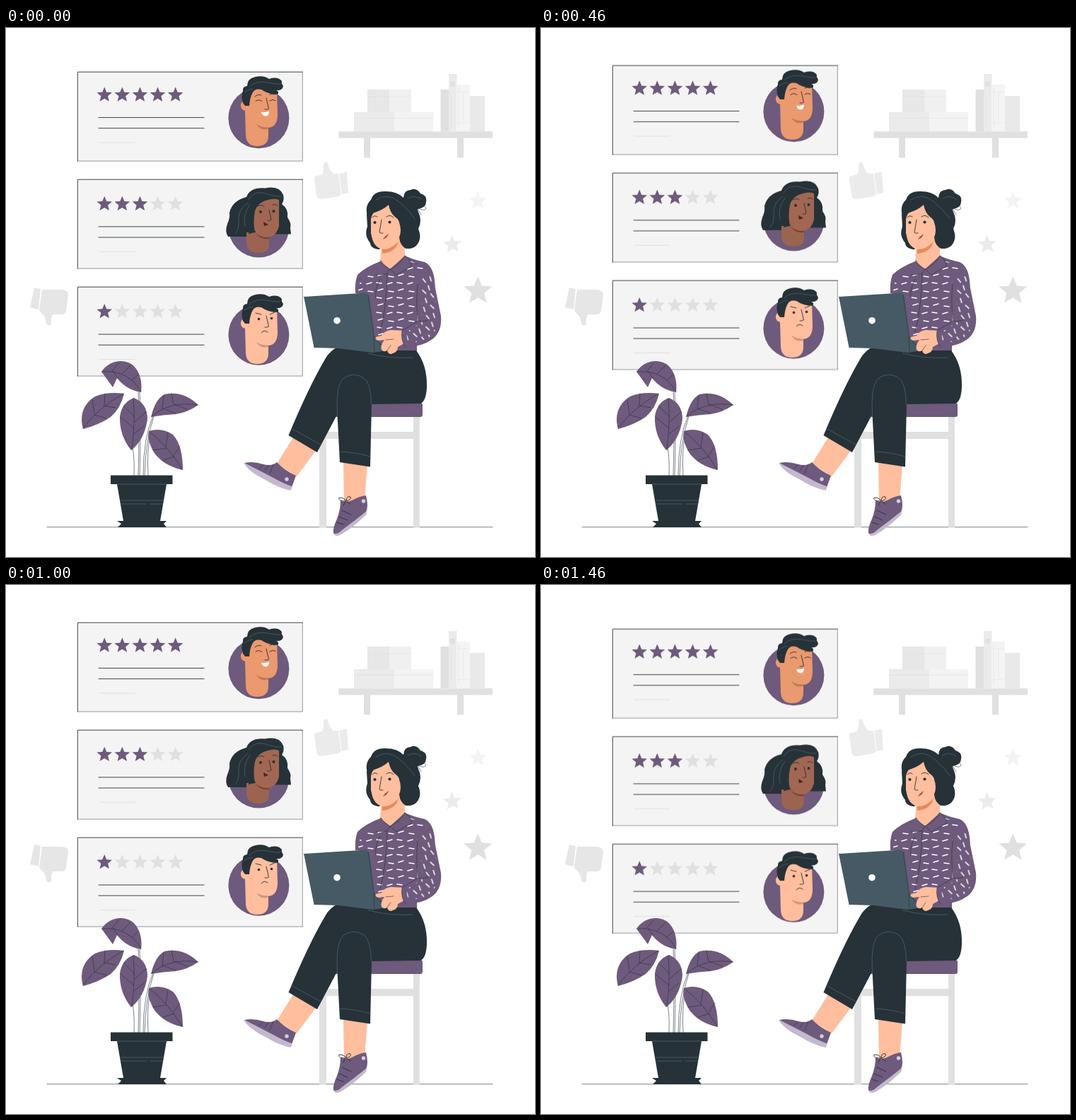
An HTML page without scripts for the animation above (1.5 s loop, 748 px wide and 748 px high).

```html
<!DOCTYPE html>
<html lang="en">
<head>
<meta charset="utf-8">
<title>Customer reviews</title>
<style>
html, body { margin: 0; width: 100%; height: 100%; overflow: hidden; background: #fff; }
svg { display: block; width: 100vw; height: 100vh; }
.dark { fill: #263238; }
.purple { fill: #6e5a7c; }
.skin { fill: #ffbe9d; }
.g1 { fill: #e0e0e0; }
.g2 { fill: #ebebeb; }
.g3 { fill: #f3f3f3; }
.line { fill: none; stroke: #263238; stroke-width: .9; stroke-linecap: round; stroke-linejoin: round; }
.thin { stroke-width: .6; }
.seam { stroke: #536872; stroke-width: .7; }
.shade { stroke: #dfdfdf; }
/* 24 steps a second: up 15px, down 15px */
.cards { animation: float 1.5s -5ms infinite steps(18, end); }
@keyframes float {
  0% { transform: translateY(0); }
  49.999% { transform: translateY(-15px); }
  50% { transform: translateY(-14px); }
  100% { transform: translateY(1px); }
}
</style>
</head>
<body>
<svg viewBox="0 0 748 748" xmlns="http://www.w3.org/2000/svg">
<defs>
  <polygon id="star" points="0,-11.3 3,-4 10.8,-3.5 4.8,1.6 6.7,9.1 0,5 -6.7,9.1 -4.8,1.6 -10.8,-3.5 -3,-4"/>

  <g id="panel">
    <rect x="101.3" y="62.2" width="318" height="125.9" fill="#f4f4f4"/>
    <path class="line" stroke-linecap="butt" d="M419.3 62.2H101.3V188.1"/>
    <path class="line" stroke-width=".6" opacity=".55" d="M101.3 188.1H419.3V62.2"/>
  </g>

  <g id="review">
    <g class="g1">
      <use href="#star" x="139.2" y="94.7"/><use href="#star" x="164.3" y="94.7"/><use href="#star" x="189.4" y="94.7"/>
      <use href="#star" x="214.5" y="94.7"/><use href="#star" x="239.6" y="94.7"/>
    </g>
    <path class="line" stroke-width=".8" d="M131 126.600H280M131 141.700H280"/>
    <path class="line shade" d="M132 162H182"/>
    <circle class="purple" cx="357.4" cy="127.2" r="43"/>
  </g>

  <g id="man">
    <path fill="currentColor" d="M342 88Q362 82 383 87L384 122Q384 140 371 141V152Q371 167 355 167Q340 167 339 152L338 117Q331 115 332 108Q334 102 338 105Z"/>
    <path fill="#000" opacity=".2" d="M354 136Q362 141 371 140.500V142.500Q360 146 354 136Z"/>
    <path class="dark" d="M335 106Q332 96 335 89Q334 83 341 82Q341 72 351 69.500Q364 66 372 72Q384 68 390 75Q389 78 392 82Q391 89 382 88Q387 90 384 94Q371 94 361 87Q352 85 349 91Q345 97 344 110H338Z"/>
    <path class="line seam" d="M344 83Q353 74 369 77T388 79M337 91Q343 86 349 86"/>
    <path class="line" d="M368 99L371.500 114Q369 116 366 115"/>
  </g>

  <pattern id="dashes" width="29" height="21" patternUnits="userSpaceOnUse">
    <path d="M2 3l7 1M17 5l7-2M4 14l7-2M19 15l7 1" fill="none" stroke="#fff" stroke-width="1.5" stroke-linecap="round"/>
  </pattern>
  <pattern id="sleeveDashes" width="24" height="20" patternUnits="userSpaceOnUse" patternTransform="rotate(62)">
    <path d="M2 4l6 1M14 6l6-1M4 14l6-2M16 16l6 1" fill="none" stroke="#fff" stroke-width="1.6" stroke-linecap="round"/>
  </pattern>
</defs>

<!-- shelf -->
<g>
  <path class="g2" d="M492 119h57v27h-57z"/>
  <path class="g3" d="M549 119h55v27h-55z"/>
  <path fill="#e7e7e7" d="M511 87h31v32h-31z"/>
  <path fill="#f0f0f0" d="M542 87h31v32h-31z"/>
  <path class="line shade thin" d="M511 97h62M492 127.500h112"/>
  <path class="g1" d="M614.500 87h12v59h-12z"/>
  <path class="g2" d="M626 65h11.500v81h-11.500z"/>
  <path fill="#f4f4f4" d="M637.500 80h18.500v66h-18.500z"/>
  <path fill="#e9e9e9" d="M656 96h21v50h-21z"/>
  <path class="g1" d="M628 76h7v5l-3.500 3-3.500-3z"/>
  <path class="line shade thin" d="M640 84v57M647 91v39M639 90h15M639 134h15M629 92v48"/>
  <path class="g1" d="M470.500 146.300H688v9.200H647V183.500H638V155.500H515V183.500H506V155.500H470.500z"/>
</g>

<!-- thumbs and stars -->
<path class="g2" d="M436 214Q435 209 440 209L447 207Q450 201 449 193Q451 187 455 191Q457 201 463 206L470 206L474 235Q472 238 465 239L446 242Q440 242 439 236ZM471 206L482 203.500L484 233L475 235Z"/>
<path fill="#e6e6e6" d="M40 367L49 369L46 398L34 395ZM51 370L79 370Q88 371 88 377L85 400Q84 405 78 405L66 405Q63 410 64 419Q60 423 57 418Q56 407 50 403L47 399Z"/>
<use href="#star" class="g3" transform="translate(667.300 244.500) scale(1.15)"/>
<use href="#star" class="g2" transform="translate(631 306) rotate(-4) scale(1.2)"/>
<use href="#star" class="g1" transform="translate(667.300 372) scale(1.85)"/>

<path class="line thin" d="M58 705.700H688"/>

<!-- review cards -->
<g class="cards">
  <use href="#panel"/><use href="#panel" y="152"/><use href="#panel" y="304"/>

  <use href="#review"/>
  <g class="purple">
    <use href="#star" x="139.2" y="94.7"/><use href="#star" x="164.3" y="94.7"/><use href="#star" x="189.4" y="94.7"/>
    <use href="#star" x="214.5" y="94.7"/><use href="#star" x="239.6" y="94.7"/>
  </g>
  <use href="#man" color="#eb996e"/>
  <path class="line" d="M353 103.500Q357 100 362 103.500M373 103Q377 100 381 102.500M352 97Q356 93 361 95M373 94Q377 92 380 94"/>
  <path fill="#fff" d="M361 119Q367 120 372 117.500Q372 124 367 124.500Q362 124 361 119Z"/>

  <use href="#review" y="154.300"/>
  <g class="purple">
    <use href="#star" x="139.2" y="249"/><use href="#star" x="164.3" y="249"/><use href="#star" x="189.4" y="249"/>
  </g>
  <path class="dark" d="M314 295Q309 288 313 277Q317 268 316 261Q320 244 340 239Q345 225 366 226.500Q387 222 392 236Q394 243 390 249Q400 256 398 268Q404 276 402 283L403 291.500H372L340 295Z"/>
  <path fill="#9b6450" d="M340 289H372V309Q370 318 357 318Q340 318 340 303Z"/>
  <path fill="#7b4232" d="M353 290Q361 297 372 295.500V298Q360 300 353 290Z"/>
  <path fill="#a16752" d="M350 259Q352 246 366 242Q378 239 386 243L386 280Q382 296 368 296Q356 295 350 284Z"/>
  <path class="dark" d="M347 263Q347 245 361 236L390 236V245Q383 240 375 242Q356 245 352 259Q349 275 352 289L343 291Z"/>
  <path class="line seam" d="M343 242Q352 229 367 234T389 238M342 247Q328 257 329 271T324 291M345 249Q334 265 338 280"/>
  <path class="line" d="M372 257L375 271Q373 273 370 272M356 252Q360 249 365 252M377 250Q381 248 384 251"/>
  <circle class="dark" cx="360" cy="260" r="2"/><circle class="dark" cx="378.500" cy="259" r="2"/>
  <path fill="#4e211b" d="M364 274L371 278L365 280Z"/>

  <use href="#review" y="306.500"/>
  <use href="#star" class="purple" x="139.2" y="401.2"/>
  <use href="#man" y="308" color="#ffbe9d"/>
  <path class="line" d="M353 403L361 405M373 405L380 402M361 431Q365 426 370 430"/>
  <circle class="dark" cx="357.500" cy="411.500" r="1.800"/><circle class="dark" cx="375.500" cy="410.500" r="1.800"/>
</g>

<!-- plant -->
<g>
  <g class="line thin">
    <path d="M181 633Q182 610 179 592M187 633Q189 550 187 515M189 633Q191 560 189 515M194 633Q194 580 208 548M196 633Q197 585 209 549M201 633Q199 600 204 572"/>
  </g>
  <path class="purple" d="M135 486C145 471 163 467 177 475C190 484 193 502 191 515C176 513 164 504 157 495L151 508Z"/>
  <path class="purple" d="M109 567C103 546 111 530 126 521Q143 514 167 517Q162 538 148 550Q132 561 109 567Z"/>
  <path class="purple" d="M177 597Q160 576 161 549Q164 529 181 523Q200 531 200 553Q196 582 177 597Z"/>
  <path class="purple" d="M205 550Q211 525 224 518Q250 512 272 533Q256 544 240 546Q222 547 205 550Z"/>
  <path class="purple" d="M250 625C226 620 211 606 206 594Q199 580 202 570Q220 564 236 575Q250 590 250 625Z"/>
  <path class="line thin" d="M136 486Q173 483 191 514M150 485l9-11M164 489l12-12M178 498l9-8M151 485l8 11
    M109 566Q129 538 166 517M125 545l-3-19M139 533l1-16M125 547l17 5M138 534l17 3
    M178 596Q183 557 180 524M181 566l-18-15M182 550l-15-15M181 574l14-11M182 557l16-14
    M206 549Q232 527 271 533M221 538l2-18M237 532l-3-15M222 538l18 7M238 532l18 7
    M249 624Q230 592 203 571M226 592l3-20M237 604l9-13M227 594l-19 3M238 606l-16 5"/>
  <path class="dark" d="M148 632.500H235.500V645H227L218 697H227L223 701L227 706H158L163 701L157 697H166L157 645H148Z"/>
  <path class="line seam" d="M157 645H227M162 668H222M163 673H199M204 673H221"/>
</g>

<!-- chair -->
<path class="g1" d="M443 548h10v23H576V548h9V706H576V581H453V706H443z"/>
<rect class="purple" x="440" y="530" width="149" height="20" rx="3"/>

<!-- feet -->
<path class="skin" d="M406 579L438 598L411 634L383 616Z"/>
<path class="purple" d="M337 615Q350 612 364 617Q376 620 383 614Q393 625 410 633L403 652Q387 647 371 637Q352 627 337 615Z"/>
<path fill="#c3b8cd" d="M336 614.500Q357 625 378 636Q392 644 405 648.500L402.500 654Q384 650 367 639Q342 627 336 614.500Z"/>
<circle cx="397" cy="638" r="2.700" fill="#d5cedb"/>
<path class="line thin" d="M364 617l-6 6M371 618l-5 8M378 617l-5 13"/>
<path class="skin" d="M477 613L511 617L507 669L478 674Z"/>
<path class="purple" d="M473 668Q481 672 489 668Q500 662 509 661Q513 676 509 685L474 714Q466 721 463 714Q462 707 468 694Q473 681 473 668Z"/>
<path fill="#c3b8cd" d="M510 683L509.500 688Q490 707 474 716Q466 721 463 714Q468 717 475 710Q494 696 510 683Z"/>
<circle cx="505.500" cy="669" r="2.700" fill="#d5cedb"/>
<path class="line" d="M480 669Q469 669 471 664Q476 663 481 668Q482 661 487 663Q489 667 481 669M480 669l-3 6M481 669l6 4M475 682l13 6M471 691l12 5M468 699l9 3"/>

<!-- hair and head -->
<path class="dark" d="M511 266Q507 251 516 243Q520 230 537 231Q553 231 562 240Q578 243 583 260Q589 272 583 284Q589 298 580 308Q570 316 557 308L540 300L528 313Q515 312 515 303Q506 294 511 281Q513 273 511 266Z"/>
<path class="dark" d="M562 240Q563 229 572 229Q580 225 586 234Q596 237 594 246Q594 254 582 256Q570 261 564 251Z"/>
<path class="line thin" d="M580 253Q591 247 594 255Q591 260 581 254L587 264"/>
<path class="line seam" d="M523 243Q540 232 556 246T578 270M568 241Q577 235 587 242"/>
<path class="skin" d="M531 300L564 294V328Q556 340 543 344L529 331Z"/>
<path fill="#e58a5d" d="M532 311Q545 312 555 302Q551 317 532 319Z"/>
<path class="skin" d="M516 263Q530 258 541 249Q546 261 555 267L560 286Q558 302 548 308Q538 315 529 312Q518 307 516 290Z"/>
<path class="dark" d="M510 264Q517 248 538 245Q553 246 562 260L576 302L566 312Q557 308 556 296Q560 286 556 275Q555 270 550 267Q543 261 541 250Q532 258 520 261Q516 266 515.500 274Q514 285 517 295Q519 308 529 313Q516 312 515 304Q508 296 511 281Z"/>
<circle class="dark" cx="521.500" cy="275" r="2.100"/><circle class="dark" cx="542.500" cy="274.500" r="2.100"/>
<path class="line" d="M531 271L528 289Q530 291 533 290M518 268Q521 264 525 267M538 267Q543 263 548 268M534 298Q538 297 540 292"/>
<path fill="#b8553c" d="M534 296L540 292L538 297Z"/>

<!-- shirt -->
<path class="purple" d="M529 330L543 341L564 322Q574 327 592 331Q605 337 606 361L582 400L581 458H521L510 377L494 375Q493 359 497 349Q508 338 529 330Z"/>
<path fill="url(#dashes)" d="M524 343L545 346L568 329L593 335L586 391L574 444H528L517 377L498 372L502 351Z"/>
<path class="line thin" d="M529 355Q521 369 523 382M539 347Q538 397 529 430"/>
<g id="collar">
  <path class="purple" d="M530 329Q535 337 543 341L538 348L523 349Q524 336 530 329ZM564 322Q574 329 573 337L552 349L543 341Q557 335 564 322Z"/>
  <path class="line thin" d="M530 329Q535 337 543 341L538 348L523 349M564 322Q574 329 573 337L552 349L543 341Q557 335 564 322"/>
</g>

<!-- trousers -->
<path class="dark" d="M399.500 576Q427 510 449 472Q461 448 484 448L520 456L580 456Q596 477 595 508Q594 528 586 531L517 532L515 620.500L472 614L468.500 546L440 600Z"/>
<path class="line seam" d="M468.500 546Q466 502 479 494Q493 486 506 495Q516 502 516.500 532M512 460Q542 468 575 466M405 567L445 589M473 599Q495 600 515 606"/>

<!-- laptop -->
<path fill="#37474f" d="M511 378L513 377L521 436L533 450V456L520 459Z"/>
<path fill="#455a64" d="M421.500 380L509 374.500Q511 374.500 511.500 377L520 437L532 451V457L518 459L470 453L436 452Z"/>
<path class="line thin" d="M421.500 380L436 452M520 437L521 458"/>
<circle cx="468" cy="413.700" r="4.800" fill="#fff"/>

<!-- arm and hand -->
<path class="skin" d="M564 428L544 427Q535 428 531 435L523 437Q521 440 526 442L535 441Q529 449 531 455Q534 459 539 456Q541 463 547 460Q554 458 554 451L565 445Z"/>
<path class="line thin" stroke="#d98260" d="M537 441L548 440M539 456L544 449"/>
<path class="purple" d="M582 352Q589 333 601 341Q606 348 607 368L615 407Q617 429 603 440Q588 451 565 451Q558 443 560 428L583 414Q579 380 582 352Z"/>
<path fill="url(#sleeveDashes)" d="M587 352Q594 342 602 350L611 408Q611 427 600 436Q584 446 568 445L566 430L588 416Z"/>
<path class="line thin" d="M582 362Q579 391 583 414L560 428Q558 443 565 451M583 414Q592 416 598 412"/>
</svg>
</body>
</html>
```
